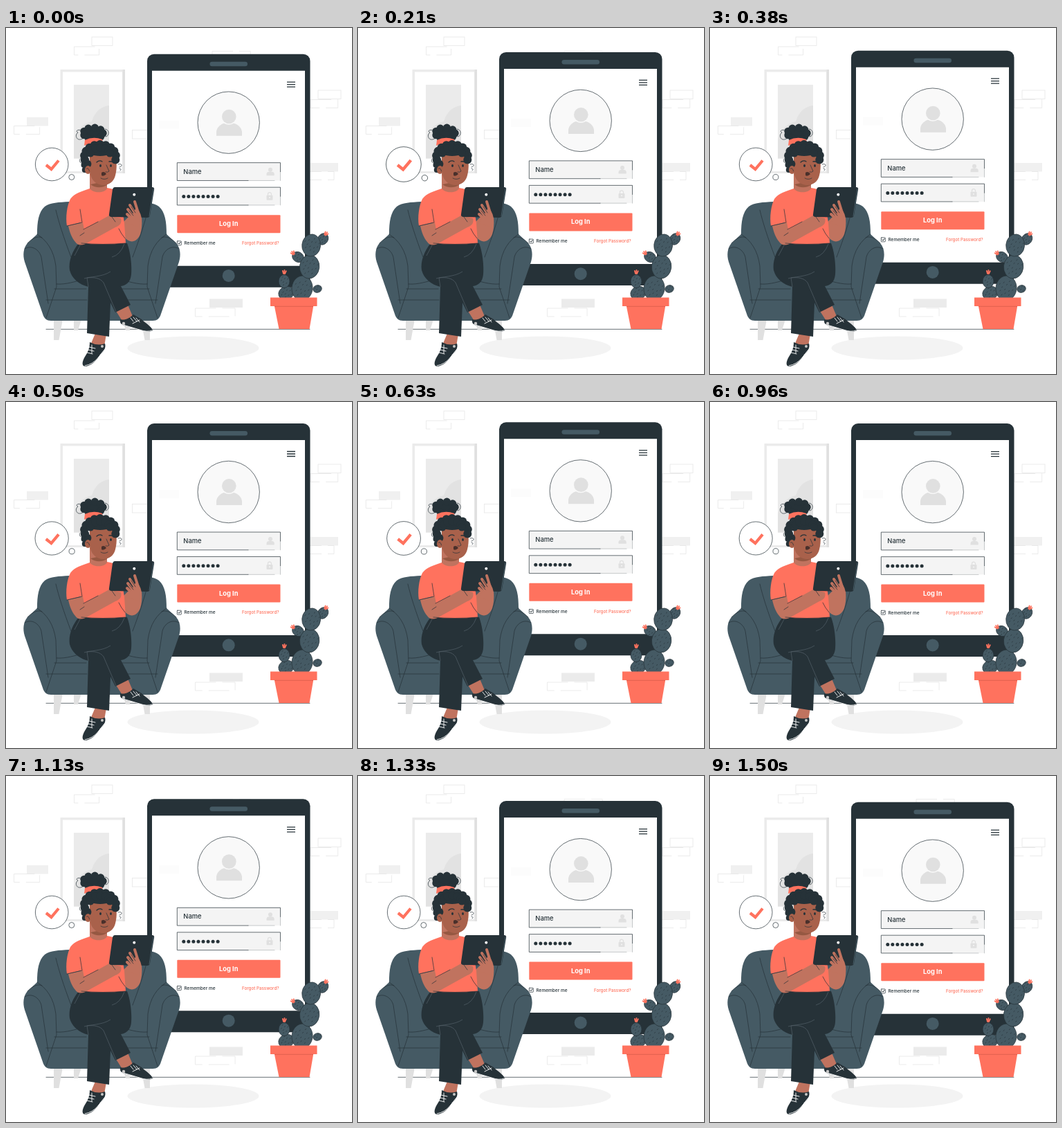
An HTML page that plays this animation: 500 px wide and 500 px high, repeating every 1540 ms.

```html
<!DOCTYPE html>
<html lang="en">
<head>
<meta charset="utf-8">
<title>Log in</title>
<style>
html, body { margin: 0; width: 100%; height: 100%; overflow: hidden; background: #fff; }
svg { display: block; width: 100%; height: 100%; }
text { font-family: Inter, "Open Sans", sans-serif; fill: #263238; font-weight: 500; }
.dark { fill: #263238; }
.slate { fill: #455a64; }
.coral { fill: #ff725e; }
.skin { fill: #c0735f; }
.face { fill: #a9614b; }
.grey { fill: #e0e0e0; }
.pale { fill: #ebebeb; }
.white { fill: #fff; }
.line { fill: none; stroke: #263238; stroke-width: .7; stroke-linecap: round; stroke-linejoin: round; }
.edge { stroke: #263238; stroke-width: .7; }
.lace { fill: none; stroke: #fff; stroke-width: .9; stroke-linecap: round; }
</style>
</head>
<body>
<svg viewBox="0 0 500 500">
  <!-- wall -->
  <g id="wall"></g>
  <path class="pale" d="M78.500 60H172V210H78.500Z"/>
  <path class="grey" d="M168.500 60H172V210H168.500Z"/>
  <path class="white" d="M82 63.500H168V207H82Z"/>
  <path class="pale" d="M98 82H149V188.500H98Z"/>
  <path fill="#e2e2e2" d="M149 112C137 113 128 122 124 135C111 138 101 148 98 162V188.500H149Z"/>
  <ellipse cx="270.500" cy="462.500" rx="95" ry="17" fill="#f3f3f3"/>
  <path class="line" d="M58 435.300H439"/>

  <!-- phone -->
  <g id="phone">
    <rect class="dark" x="204" y="38" width="235.500" height="337" rx="10"/>
    <path class="white" d="M211 62H432V344H211Z"/>
    <path fill="#fcfcfc" d="M221 134H250V146H221Z"/>
    <rect class="slate" x="294.500" y="49" width="54.500" height="6.500" rx="3.250"/>
    <circle class="slate" cx="321.700" cy="358.300" r="9"/>
    <path d="M406 78.500h12m-12 3.500h12m-12 3.500h12" stroke="#263238" stroke-width="1.400"/>
    <circle class="edge" cx="321.700" cy="137" r="44.700" fill="#f9f9f9"/>
    <circle class="grey" cx="322.300" cy="128.300" r="10.300"/>
    <path class="grey" d="M304 156V150C305 143 311 139 315 138Q322 142 329 138C334 139 340 143 341 150V156Z"/>
    <g id="fields"></g>
    <text x="256.300" y="211" font-size="9.400">Name</text>
    <g class="grey">
      <circle cx="382" cy="205" r="3"/>
      <path d="M376.500 213.500V211Q377 208 380 208H384Q387.500 208 387.700 211V213.500Z"/>
      <rect x="376.500" y="242" width="9" height="7" rx="1"/>
    </g>
    <path d="M378.500 242V240.500A2.500 2.500 0 0 1 383.500 240.500V242" fill="none" stroke="#e0e0e0" stroke-width="1.300"/>
    <circle cx="381" cy="245.300" r="1" fill="#f4f4f4"/>
    <g class="dark" id="dots"></g>
    <rect class="coral" x="247.300" y="270.500" width="149.200" height="26" rx="1"/>
    <text x="321.800" y="286.600" font-size="9.300" text-anchor="middle" style="fill:#fff;font-weight:700">Log In</text>
    <rect class="line" x="247.300" y="308.200" width="6" height="6" rx=".6"/>
    <path class="line" style="stroke-width:1" d="M248.700 311.200L250 312.500L252.200 309.700"/>
    <text x="257.500" y="313.400" font-size="6.500">Remember me</text>
    <text x="341" y="313.400" font-size="6.250" style="fill:#ff725e">Forgot Password?</text>
  </g>

  <!-- cactus -->
  <g id="cactus"></g>
  <path class="coral" d="M387.500 400H444.500L438.500 435H394.500ZM382 389.500H449.500V402H382Z"/>
  <path d="M388 402.300H444" stroke="#d95c4b" stroke-width=".8"/>

  <!-- armchair: one half, mirrored -->
  <defs>
    <g id="half">
      <path class="grey" d="M69 421H82L76.500 451H69ZM98 421H109L104 437H98Z"/>
      <path class="slate" d="M140 251H92C76 252 64 252 56 258C47 266 45 280 45 298L31 311C25 318 24 328 27 338L53 413C55 420 59 423 65 423H140Z"/>
      <path class="line" d="M45 298C59 307 69 321 72 344L73 374L58 419M31 311C39 303 46 300 52 303M27 319C37 313 48 320 51 331L61 398M73 370C87 371 101 366 113 363M70 377H116M58 393H117M72 263C76 280 83 302 94 331"/>
    </g>
  </defs>
  <use href="#half"/>
  <use href="#half" transform="translate(277) scale(-1 1)"/>

  <!-- legs -->
  <path class="skin" d="M130 439L145 442L142 460L122 458ZM157 406L176 400L184 419L169 425Z"/>
  <path class="dark" d="M105 311H175C180 324 182 343 181 356C180 367 174 372 166 373L180 400L158 411L151 397L149 446L117 441L119 374C106 371 95 362 92 350C90 337 96 322 105 311Z"/>
  <path d="M119 374L117 361C127 360 136 361 141 368L159 410M113 362C122 359 139 360 151 352M171 312Q165 328 153 331M107 314L99 329" fill="none" stroke="#536169" stroke-width=".7"/>

  <!-- shoes -->
  <path class="dark" d="M165 421C171 423 178 420 184 414L196 421C202 427 210 431 212 437C208 440 199 438 193 436L168 429Q164 426 165 421Z"/>
  <path class="lace" d="M166 428L193 436Q204 440 211 437M180 419l4 5M184 418l5 6M188 419l5 6M193 422L183 427"/>
  <circle cx="170" cy="427" r="2.200" fill="#c7c7c7"/>
  <path class="dark" d="M121 454Q132 460 143 456C145 462 141 468 136 472C131 481 122 489 114 489C109 488 110 482 114 475C118 469 121 463 121 454Z"/>
  <path class="lace" d="M143 464C136 471 131 485 114 488M120 461l9 2M119 465l8 2M117 469l8 2M124 458V470"/>
  <circle cx="139" cy="460" r="2" fill="#c7c7c7"/>

  <!-- torso -->
  <path class="skin" d="M164 286L174 276L191 259C197 267 198 285 194 298C190 308 182 311 175 306C170 302 167 296 164 286Z"/>
  <path class="coral" d="M121 232C109 236 99 239 93 247C88 257 86 273 88 286L108 281L106 311Q140 314 173 311L171 282L165 240C160 234 153 232 146 231Z"/>
  <path class="skin" d="M121 210H146V232C142 239 126 239 121 232Z"/>
  <path d="M122 226C130 232 139 231 146 227V221Z" fill="#965842"/>
  <path class="skin" d="M90 286L111 281L113 291L149 271L166 275C168 282 164 286 158 288L120 309C111 315 104 315 100 309C95 303 92 295 90 286Z"/>
  <path class="line" d="M88 286L110 281L107 262M112 291L133 280M113 296L107 300M109 311Q139 314 173 311M172 304Q166 297 163 290"/>

  <!-- tablet -->
  <path class="dark" d="M157 230H211Q215 230 214 234L208 271Q207 274 204 274L152 273Q148 272 149 269L154 233Q155 230 157 230Z"/>
  <path d="M213 232L207 272" stroke="#455a64"/>
  <circle class="white" cx="185.300" cy="240.700" r="2"/>
  <path d="M186 251l5 16M179 256l9 14M176 262l9 12M175 269l10 10" fill="none" stroke="#c0735f" stroke-width="4" stroke-linecap="round"/>
  <path class="skin" d="M188 260C196 266 198 279 194 288L174 282L181 272Z"/>
  <path class="line" d="M181 258l6 9M178 264l6 7M153 273l5 7"/>

  <!-- head -->
  <path class="line" d="M112 159C103 166 98 155 104 151C99 149 105 145 110 149M143 146C151 147 149 157 144 157M162 197C168 195 169 200 164 201M164 203Q168 204 165 206M111 187C104 188 105 197 112 195"/>
  <g class="dark" id="bun"></g>
  <path class="coral" d="M114 162Q126 156 139 161L140 168Q126 164 113 170Z"/>
  <path class="face" d="M121 180H157C160 189 161 202 158 213C156 222 148 228 139 227C129 226 122 218 121 207Z"/>
  <g class="dark" id="hair"></g>
  <ellipse class="face" cx="118.500" cy="205" rx="4.500" ry="6"/>
  <path class="line" d="M116.500 203Q120 202 120.500 207M145 198L149 207Q147 209 144 208M137 217Q142 220 147 217"/>
  <path class="line" style="stroke-width:1.300" d="M131 194Q135 190.500 139 193M149 193Q153 192 155.500 195"/>
  <ellipse class="dark" cx="136.500" cy="199" rx="1.500" ry="2"/>
  <ellipse class="dark" cx="151.500" cy="199" rx="1.400" ry="2"/>
  <path d="M138 209Q142 206 145 211Q141 215 138 213Z" fill="#4a302b"/>

  <!-- bubble -->
  <g id="bubble">
    <circle class="white edge" cx="66.200" cy="197" r="23.800"/>
    <circle class="white edge" cx="94.800" cy="215.500" r="4"/>
    <path d="M58 198L65.500 204L76 191.500" fill="none" stroke="#ff725e" stroke-width="4.200"/>
  </g>
</svg>
<script>
const LOOP = 1540, STEPS = 37, CYCLE = 36, RISE = 10;
const $ = id => document.getElementById(id);

function add(parent, tag, attrs) {
  const el = document.createElementNS("http://www.w3.org/2000/svg", tag);
  for (const key in attrs) el.setAttribute(key, attrs[key]);
  $(parent).appendChild(el);
}

// A solid brick with an outlined one beside it
function bricks(x, y, w, dx, dy, fill) {
  add("wall", "rect", { x, y, width: w, height: 12.5, fill: fill || "none", stroke: fill ? "none" : "#e6e6e6", "stroke-width": .8 });
  add("wall", "rect", { x: x + dx, y: y + dy, width: w * 1.2, height: 12, fill: "none", stroke: "#e6e6e6",
    "stroke-width": .8, "stroke-dasharray": "30 9" });
}
bricks(124, 13, 30, -25.5, 14);
bricks(30, 129, 31, -18.5, 12.5, "#f0f0f0");
bricks(451, 90, 33, -11, 13.5);
bricks(440, 195, 40, -14, 12.5, "#f0f0f0");
bricks(294, 391.5, 48, -20.5, 13.5, "#ebebeb");
bricks(182.5, 147.5, 46, 115.5, -114);

for (const y of [195, 230.5]) {
  add("fields", "rect", { x: 247.3, y, width: 149.2, height: 25.8, fill: "#f4f4f4" });
  add("fields", "path", { class: "line", d: `M350 ${y + 25.8}H247.3V${y}H396.5V${y + 13}` });
  add("fields", "path", { class: "line", d: `M350 ${y + 25.8}H388M396.5 ${y + 13}V${y + 25.8}`, opacity: .35 });
}
for (let i = 0; i < 8; i++) add("dots", "circle", { cx: 256.8 + i * 7.05, cy: 243.8, r: 2.5 });

// Round curls along an arc, angles in turns
function curls(id, x, y, rx, ry, r, n, from = 0, to = 1) {
  for (let i = 0; i <= n; i++) {
    const a = 2 * Math.PI * (from + (to - from) * i / n);
    add(id, "circle", { cx: x + rx * Math.cos(a), cy: y + ry * Math.sin(a), r });
  }
}
add("bun", "ellipse", { cx: 126, cy: 152, rx: 14, ry: 9 });
curls("bun", 126, 152, 14, 8, 5.5, 9);
add("hair", "ellipse", { cx: 136, cy: 176, rx: 20, ry: 9 });
curls("hair", 136, 186, 23, 18, 6, 11, .4, 1.04);
curls("hair", 136, 181, 14, 8, 5.5, 6, .5, 1);
curls("hair", 115, 198, 2.5, 8, 4, 6);

function pad(x, y, r, tilt) {
  add("cactus", "ellipse", { class: "slate edge", cx: x, cy: y, rx: r, ry: r * 1.2, transform: `rotate(${tilt} ${x} ${y})` });
  let d = "";
  for (let i = 1; i < r; i++) {
    const q = r * .85 * Math.sqrt(i / r), a = i * 2.4;
    d += `M${x + Math.cos(a) * q} ${y + Math.sin(a) * q}l1.2 -1`;
  }
  add("cactus", "path", { class: "line", d });
}
function flower(x, y, tilt) {
  add("cactus", "path", { d: "M-1 0L-2.500 -4M0 0V-5M1 0L2.500 -4", stroke: "#ff725e", "stroke-width": 1.8,
    "stroke-linecap": "round", transform: `translate(${x} ${y}) rotate(${tilt})` });
}
pad(405, 383, 9.5, 70);
pad(450, 377, 5.3, 75);
pad(402, 366, 8, 0);
pad(458, 305, 7.3, 35);
pad(422, 331, 7.3, -60);
for (let i = 0; i < 3; i++) pad(428 + 13.5 * Math.sin(i * .9), 376 - 31 * i, 15 - i * .8, 6);
flower(461, 299, 40);
flower(416, 327, -35);
flower(402, 355, 5);

function draw(now) {
  const t = now % LOOP;
  const step = Math.min(STEPS - 1, Math.floor((t + 8) * STEPS / LOOP));
  const y = -RISE * (1 - Math.abs(1 - (step + .6) % CYCLE / (CYCLE / 2)));
  const ms = step * 1500 / CYCLE;
  // Fading double heartbeat
  const beat = ms < 1050 ? .105 * Math.exp(-ms / 430) * Math.sin(Math.PI * ms / 410) ** 2 : 0;
  $("phone").setAttribute("transform", `translate(0 ${y})`);
  $("bubble").setAttribute("transform", `translate(70.5 197) scale(${1 + beat}) translate(-70.5 -197)`);
}

const start = performance.now();
function tick() {
  draw(performance.now() - start);
  requestAnimationFrame(tick);
}
tick();
</script>
</body>
</html>
```
